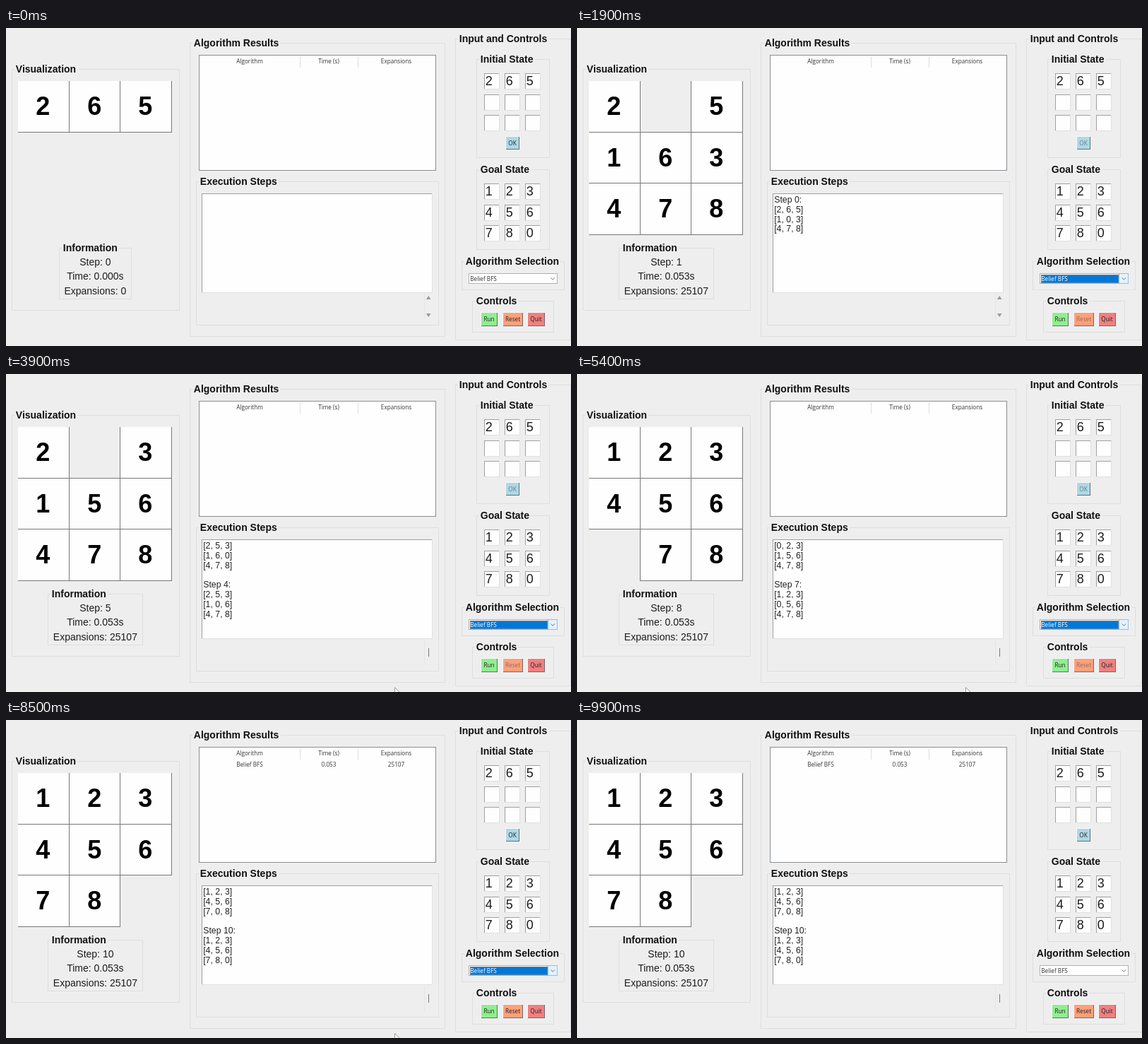
An HTML page with a canvas that plays this animation: 800x450 px, repeating every 10000 ms.

```html
<!DOCTYPE html>
<html lang="en">
<head>
<meta charset="utf-8">
<title>Puzzle solver</title>
<style>
html, body { margin: 0; width: 100%; height: 100%; overflow: hidden; background: #eeeeef; }
canvas { display: block; width: 800px; height: 450px; }
</style>
</head>
<body>
<canvas id="stage" width="800" height="450"></canvas>
<script>
const ctx = document.getElementById('stage').getContext('2d');
const BG = '#eeeeef';
const SANS = '"Liberation Sans", Arial, sans-serif';
const UI = '"Open Sans", "Noto Sans", sans-serif';
const LOOP = 10000;

// Timeline in ms
const SELECT = 700, RUN = 1200, FIRST = 1400, STEP = 500, TEXT_LAG = 100;
const POINTER_IN = 2300, DONE = 7000, POINTER_OUT = 9200, DESELECT = 9500;

// Board after each move of the blank
const boards = ['265103478'];
for (const d of [-3, 1, 3, -1, -3, -1, 3, 3, 1, 1]) {
  const b = [...boards[boards.length - 1]];
  const i = b.indexOf('0');
  [b[i], b[i + d]] = [b[i + d], b[i]];
  boards.push(b.join(''));
}

// Log lines, five for each step
const log = boards.flatMap((b, n) => [
  `Step ${n}:`,
  ...[0, 3, 6].map(r => `[${[...b.slice(r, r + 3)].join(', ')}]`),
  ''
]);

const stepAt = t => Math.min(10, Math.floor((t - FIRST) / STEP));

function box(x, y, w, h, color) {
  ctx.fillStyle = color;
  ctx.fillRect(x, y, w, h);
}

function outline(x, y, w, h, color) {
  ctx.strokeStyle = color;
  ctx.lineWidth = 1;
  ctx.strokeRect(x + 0.5, y + 0.5, w, h);
}

function text(s, x, y, font, color = '#1c1c1c', align = 'left') {
  ctx.font = font;
  ctx.fillStyle = color;
  ctx.textAlign = align;
  ctx.textBaseline = 'alphabetic';
  ctx.fillText(s, x, y);
}

const ui = (s, x, y, color = '#333', align = 'center') =>
  text(s, x, y, `8.2px ${UI}`, color, align);

function path(points, fill, stroke) {
  ctx.beginPath();
  points.forEach(([x, y], i) => i ? ctx.lineTo(x, y) : ctx.moveTo(x, y));
  if (fill) {
    ctx.closePath();
    ctx.fillStyle = fill;
    ctx.fill();
  }
  if (stroke) {
    ctx.strokeStyle = stroke;
    ctx.lineWidth = 1;
    ctx.stroke();
  }
}

function group(title, x, y, r, b) {
  outline(x, y, r - x, b - y, '#dededf');
  ctx.font = `bold 14px ${SANS}`;
  box(x + 4, y - 7, ctx.measureText(title).width + 4, 15, BG);
  text(title, x + 5.8, y + 5, `bold 14px ${SANS}`, '#111');
}

function sunken(x, y, w, h) {
  box(x, y, w, h, '#fefefe');
  box(x, y, w, 1, '#a0a0a0');
  box(x, y, 1, h, '#a0a0a0');
  box(x, y + h - 1, w, 1, '#e0e0e0');
  box(x + w - 1, y, 1, h, '#e0e0e0');
}

function entries(y0, digits) {
  for (let i = 0; i < 9; i++) {
    const x = 677 + 29 * (i % 3);
    const y = Math.round(y0 + 29.6 * Math.floor(i / 3));
    sunken(x, y, 22, 23);
    if (digits[i]) text(digits[i], x + 1.8, y + 16.7, `18px ${SANS}`);
  }
}

function button(label, x, y, w, h, fill, color = '#222') {
  box(x, y, w, h, '#f8f8f8');
  box(x + 1, y + 1, w - 1, h - 1, '#6c6c6c');
  box(x + 1, y + 1, w - 2, h - 2, fill);
  ui(label, x + w / 2, y + h / 2 + 3, color);
}

function tiles(board) {
  const edge = k => Math.round(72.67 * k);
  const cells = [...board]
    .map((d, i) => ({ d, c: i % 3, r: Math.floor(i / 3) }))
    .filter(cell => cell.d !== '0')
    .map(({ d, c, r }) => ({
      d,
      x: 16 + edge(c), y: 74 + edge(r),
      w: edge(c + 1) - edge(c), h: edge(r + 1) - edge(r)
    }));
  ctx.save();
  ctx.beginPath();
  ctx.rect(17, 75, 220, 220);
  ctx.clip();
  cells.forEach(({ x, y, w, h }) => box(x, y, w, h, '#fefefe'));
  cells.forEach(({ d, x, y, w, h }) => {
    outline(x, y, w, h, '#777');
    text(d, x + 36.3, y + 48.7, `bold 36px ${SANS}`, '#000', 'center');
  });
  ctx.restore();
}

function visualization(step) {
  const solved = step >= 0;
  group('Visualization', 8, 58, 245, 399);
  tiles(solved ? boards[step] : '265000000');
  if (solved) group('Information', 59, 311, 193, 383);
  else group('Information', 75, 311, 177, 383);
  const rows = [
    `Step: ${Math.max(0, step)}`,
    `Time: ${solved ? '0.053' : '0.000'}s`,
    `Expansions: ${solved ? 25107 : 0}`
  ];
  rows.forEach((s, i) => text(s, 126.4, 336 + 20.4 * i, `14px ${SANS}`, '#1c1c1c', 'center'));
}

function results(done) {
  group('Algorithm Results', 260, 21, 621, 436);
  box(273, 38, 335, 163, '#fefefe');
  outline(273, 38, 335, 163, '#8b8d91');
  box(416, 40, 1, 16, '#dedede');
  box(498, 40, 1, 16, '#dedede');
  const row = (cells, y) => cells.forEach((s, i) => ui(s, [345, 457, 552.5][i], y));
  row(['Algorithm', 'Time (s)', 'Expansions'], 50.2);
  if (done) row(['Belief BFS', '0.053', '25107'], 66.2);
}

function execution(step) {
  group('Execution Steps', 269, 217, 612, 420);
  sunken(277, 234, 327, 141);
  const count = 5 * (step + 1);
  const top = Math.max(0, count - 9);
  log.slice(top, count).forEach((s, i) =>
    text(s, 279.2, 246.8 + 13.85 * i, `12.3px ${SANS}`, '#222'));
  box(592, 377, 1, 35, '#e6e6e7');
  if (step > 0) {
    box(598, 388, 1, 12, '#777');
  } else {
    path([[595, 384], [601.5, 384], [598.2, 379]], '#999');
    path([[595, 404], [601.5, 404], [598.2, 409]], '#999');
  }
}

function combo(active) {
  box(655, 347, 125, 15, '#fefefe');
  outline(655, 347, 125, 14, '#b2b2b2');
  if (active) {
    box(657, 349, 110, 12, '#0078d7');
    ctx.setLineDash([1, 1]);
    outline(657, 349, 109, 11, '#c8906a');
    ctx.setLineDash([]);
    box(768, 348, 12, 13, '#e5f1fb');
    outline(767, 347, 13, 14, '#8fc0e6');
  }
  ui('Belief BFS', 657.3, 357.5, active ? '#fff' : '#333', 'left');
  path([[771.5, 353.5], [774.2, 356.2], [777, 353.5]], null, '#777');
}

function controls(t, busy) {
  group('Input and Controls', 636, 15, 799, 441);
  group('Initial State', 666, 44, 769, 183);
  entries(64, '265');
  button('OK', 707, 153, 20, 19, '#add8e6', busy ? '#6a7b82' : '#222');
  group('Goal State', 666, 200, 769, 313);
  entries(220, '123456780');
  group('Algorithm Selection', 645, 330, 790, 370);
  combo(t >= SELECT && t < DESELECT);
  group('Controls', 660, 386, 775, 430);
  button('Run', 672, 402, 24, 20, '#90ee90');
  button('Reset', 703, 402, 29, 20, '#ffa07a', busy ? '#8a6a60' : '#222');
  button('Quit', 738, 402, 25, 20, '#f08080');
}

function pointer() {
  path([[550.5, 443.5], [550.5, 456], [553.5, 453], [560, 453]], '#fff', '#999');
}

function draw(t) {
  box(0, 0, 800, 450, BG);
  visualization(t < FIRST ? -1 : stepAt(t));
  results(t >= DONE);
  execution(t < FIRST + TEXT_LAG ? -1 : stepAt(t - TEXT_LAG));
  controls(t, t >= RUN && t < DONE);
  if (t >= POINTER_IN && t < POINTER_OUT) pointer();
}

const start = performance.now();
function frame() {
  draw((performance.now() - start) % LOOP);
  requestAnimationFrame(frame);
}
frame();
</script>
</body>
</html>
```
